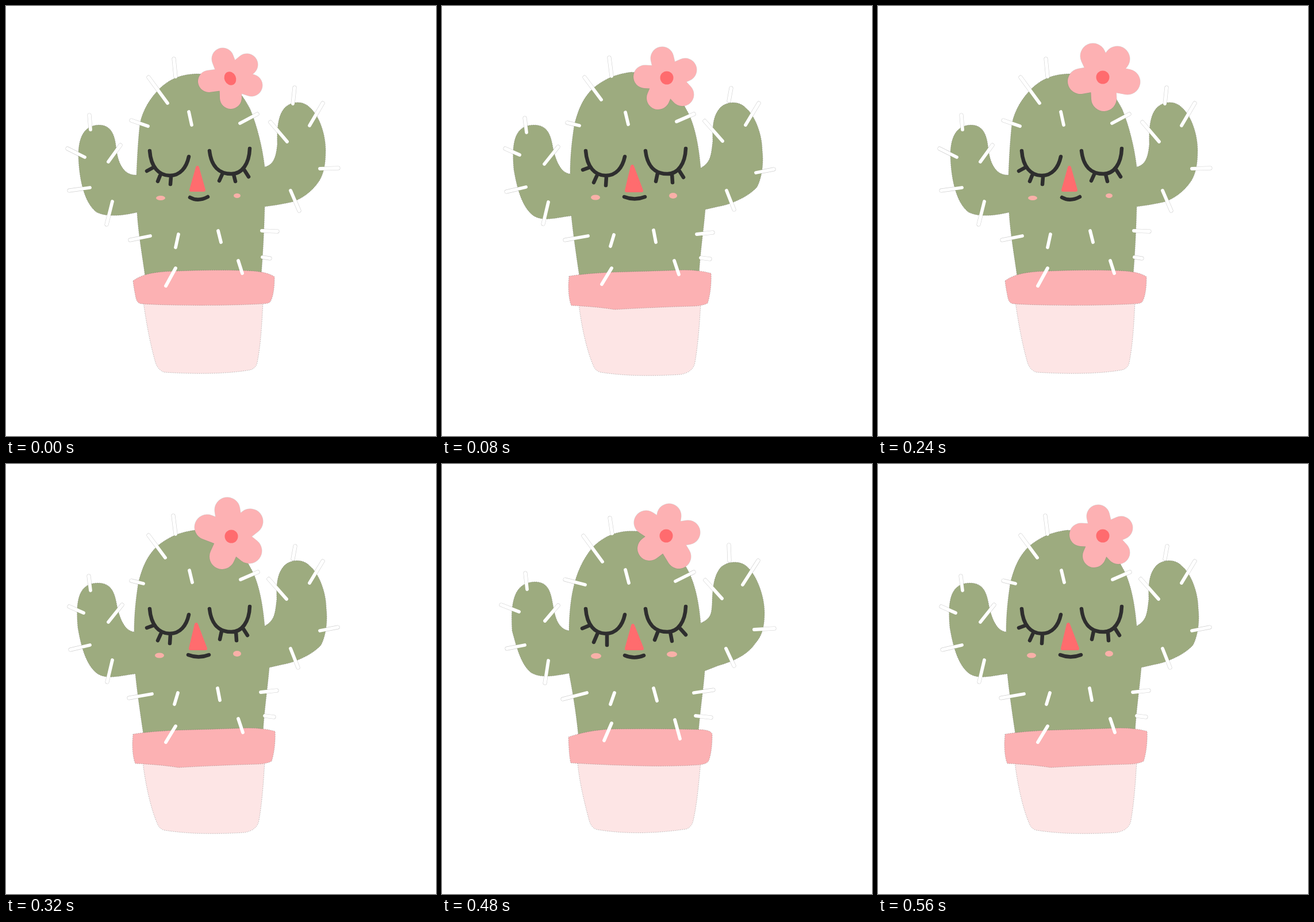
An HTML page for the animation above (0.64 s loop, 748 px wide and 748 px high).

```html
<!DOCTYPE html>
<html lang="en">
<head>
<meta charset="utf-8">
<title>Sleepy cactus</title>
<style>
  html, body { margin: 0; width: 100%; height: 100%; overflow: hidden; background: #fff; }
  svg { display: block; width: 100vw; height: 100vh; }
  path { stroke-linecap: round; stroke-linejoin: round; fill: none; }
  .edge { stroke: #555; stroke-width: 1; stroke-dasharray: 1 2.2; stroke-opacity: .6; stroke-linecap: butt; }
  .plant { fill: #9dab7f; }
  .pot { fill: #fde5e5; }
  .rim { fill: #fcb1b3; }
  .halo { stroke: #cfcfcf; stroke-width: 7; }
  .spines { stroke: #fff; stroke-width: 5.8; }
  .ink { stroke: #2e2e2e; stroke-width: 6.5; }
  .nose { fill: #ff6c6e; stroke: #ff6c6e; stroke-width: 6; }
  .cheek { fill: #f9b0a8; }
  .shade { stroke: #777; stroke-opacity: .3; }
  .petals { stroke: #fdb1b3; }
  .heart { fill: #ff6b6e; }
</style>
</head>
<body>
<svg id="stage" viewBox="0 0 748 748"></svg>
<script>
const STEP = 80;
const bodyOrder = [0, 2, 1, 0, 2, 0, 1, 2];
const flowerOrder = [0, 1, 2, 3, 4, 3, 2, 1];

const eyes = 'M250 252C252 280 266 295 285 295C303 295 314 281 318 262' +
             'M354 252C357 279 371 292 392 292C411 292 423 274 424 248';

const bodies = [
  {
    plant: `M242 470C238 440 230 395 228 359C205 364 178 368 158 359C138 345 127 305 126 260
      C126 232 134 207 162 207C186 207 190 230 192 250C195 272 204 295 227 294
      C228 265 230 230 233 205C238 180 251 160 268 143C288 124 310 118 335 118C385 122 408 146 425 180
      C437 210 446 245 450 280C466 276 470 262 472 240C471 210 474 190 484 178C497 164 518 165 529 177
      C546 192 556 225 556 250C556 275 553 291 545 304C532 324 512 337 497 341Q475 346 450 349
      C449 390 447 430 444 468Z`,
    pot: `M239 515C244 550 250 585 260 620Q264 633 275 637C320 640 380 641 425 633Q435 630 437 620
      C443 590 445 555 447 515Z`,
    rim: `M221 478C240 465 260 462 300 461C350 459 400 459 430 461Q455 463 467 471C467 490 465 505 460 514
      Q458 518 445 518C400 521 300 522 235 518Q228 517 226 508C224 498 222 488 221 478Z`,
    spines: `M292 92L295 123M248 124L281 169M218 199L247 209M318 184L323 207M407 204L437 188M502 142L499 170
      M551 169L528 208M460 202L489 236M546 283L578 282M495 321L510 356M145 190L147 215M107 248L137 263
      M199 242L178 271M110 321L146 316M185 340L175 380M216 407L251 400M300 397L295 420M369 391L374 411
      M445 391L472 392M446 437L459 439M404 443L411 465M295 456L278 487`,
    lashes: 'M256 281L245 287M268 295L264 305M287 297L286 310M376 293L371 304M396 293L399 305M415 286L422 297',
    nose: 'M333 281L322 320L344 320Z',
    mouth: 'M320 333Q334 341 351 332',
    cheeks: [[269, 334, 8, 4], [402, 330, 6, 4]]
  },
  {
    plant: `M237 470C233 430 227 395 221 364C195 369 172 373 155 363C138 350 130 320 122 290
      C119 240 125 205 163 205C190 206 190 232 195 255C199 277 208 288 221 290
      C221 270 223 240 228 218C234 190 245 165 262 145C285 122 310 115 340 117C385 125 410 150 425 180
      C440 205 447 240 450 277C468 268 469 262 470 240C471 210 474 195 483 182C495 168 520 167 532 180
      C548 195 561 230 561 258C561 285 556 300 545 312C530 335 500 345 480 351L457 360C455 390 450 420 446 468Z`,
    pot: `M236 518C238 550 248 590 256 620Q260 634 270 636C320 644 370 643 425 635Q435 631 437 620
      C444 590 447 550 450 518Z`,
    rim: `M220 475C240 468 265 462 300 461Q380 460 450 462Q468 463 470 470C470 490 468 505 464 516
      Q462 521 450 523C400 527 330 526 224 520Q221 510 220 475Z`,
    spines: `M292 94L296 121M246 125L279 170M214 201L249 210M319 184L325 207M406 204L438 188M499 141L500 168
      M550 168L523 210M458 202L487 234M543 288L578 286M494 321L508 351M145 190L148 218M103 245L134 257
      M202 246L179 273M113 321L144 315M185 342L179 381M210 409L252 398M300 398L293 418M368 390L374 412
      M438 398L472 393M441 438L468 441M405 445L414 478M295 451L282 481`,
    lashes: 'M256 281L244 286M270 296L264 310M287 296L287 315M375 293L370 306M397 292L400 308M415 287L424 297',
    nose: 'M332 281L321 321L348 321Z',
    mouth: 'M318 333Q335 340 351 333',
    cheeks: [[268, 334, 9, 5], [400, 331, 9, 5]]
  },
  {
    plant: `M239 470C233 430 228 395 225 365C200 368 175 376 158 364C140 350 131 320 125 285
      C121 240 125 207 160 207C190 207 190 235 195 255C201 277 210 291 223 292
      C223 260 226 235 230 208C237 180 245 160 263 143C285 125 305 118 330 115C385 122 408 146 425 180
      C440 205 447 245 450 282C467 272 468 262 471 235C470 205 473 190 483 178C495 165 517 165 528 177
      C545 190 557 225 557 250C560 275 556 300 548 315C535 330 505 345 480 349L458 354C455 390 449 430 447 468Z`,
    pot: `M238 518C242 555 252 600 263 625Q266 634 275 637C320 644 365 644 415 641Q437 637 440 620
      C446 585 448 550 450 518Z`,
    rim: `M221 470Q250 465 300 463L400 460Q440 457 468 465C469 485 466 505 462 517Q455 521 440 522
      Q370 524 300 528Q270 523 225 521Q220 510 220 485Z`,
    spines: `M291 90L295 122M248 124L277 163M218 203L239 208M319 185L324 206M408 201L438 188M503 143L499 165
      M551 169L528 207M457 200L488 235M546 290L577 284M495 321L508 354M144 195L147 220M110 248L135 259
      M202 245L178 275M112 323L146 315M185 341L176 379M214 407L254 400M299 398L293 418M368 390L372 411
      M443 397L471 394M450 438L466 440M404 443L412 467M295 456L278 484`,
    lashes: 'M256 281L245 285M269 296L264 307M286 296L285 312M375 291L372 305M400 292L401 307M413 287L420 298',
    nose: 'M331 279L321 321L347 321Z',
    mouth: 'M317 332Q335 339 353 332',
    cheeks: [[267, 333, 8, 4.5], [402, 330, 7, 5]]
  }
];

// Each petal is a thick round stroke from the centre to its point.
const flowers = [
  { center: [390, 126], r: 19, tips: [[377, 92], [419, 102], [427, 138], [391, 160], [353, 131]] },
  { center: [391, 125], r: 20, tips: [[383, 91], [423, 111], [418, 154], [376, 160], [353, 123]] },
  { center: [390, 125], r: 21, tips: [[395, 90], [428, 119], [412, 161], [361, 147], [355, 102]] },
  { center: [391, 124], r: 22, tips: [[374, 87], [416, 92], [434, 132], [393, 161], [352, 131]] },
  { center: [392, 126], r: 22, tips: [[385, 80], [425, 100], [423, 151], [376, 161], [350, 110]] }
];

const path = (cls, d) => `<path class="${cls}" d="${d}"/>`;
const ellipse = (cls, [x, y, rx, ry], turn = 0) =>
  `<ellipse class="${cls}" cx="${x}" cy="${y}" rx="${rx}" ry="${ry}" transform="rotate(${turn} ${x} ${y})"/>`;

const drawBody = b =>
  path('halo', b.spines) + path('plant edge', b.plant) +
  path('pot edge', b.pot) + path('rim edge', b.rim) +
  path('spines', b.spines) + path('ink', eyes + b.lashes + b.mouth) +
  path('nose', b.nose) + b.cheeks.map(c => ellipse('cheek', c)).join('');

function drawFlower({ center, r, tips }, i) {
  const d = tips.map(tip => `M${center}L${tip}`).join('');
  const stroke = (cls, width) => `<path class="${cls}" d="${d}" stroke-width="${width}"/>`;
  const heart = i ? [...center, 11.5, 11.5] : [...center, 10, 12];
  return stroke('shade', 2 * r + 1) + stroke('petals', 2 * r) + ellipse('heart', heart, i ? 0 : -25);
}

const stage = document.getElementById('stage');

function addPoses(poses, draw, order) {
  poses.forEach((pose, i) => {
    const group = document.createElementNS('http://www.w3.org/2000/svg', 'g');
    group.innerHTML = draw(pose, i);
    stage.append(group);
    const frames = [...order, order[0]].map((shown, n) => ({
      opacity: shown === i ? 1 : 0,
      offset: n / order.length,
      easing: 'step-end'
    }));
    group.animate(frames, { duration: STEP * order.length, iterations: Infinity });
  });
}

addPoses(bodies, drawBody, bodyOrder);
addPoses(flowers, drawFlower, flowerOrder);
</script>
</body>
</html>
```
